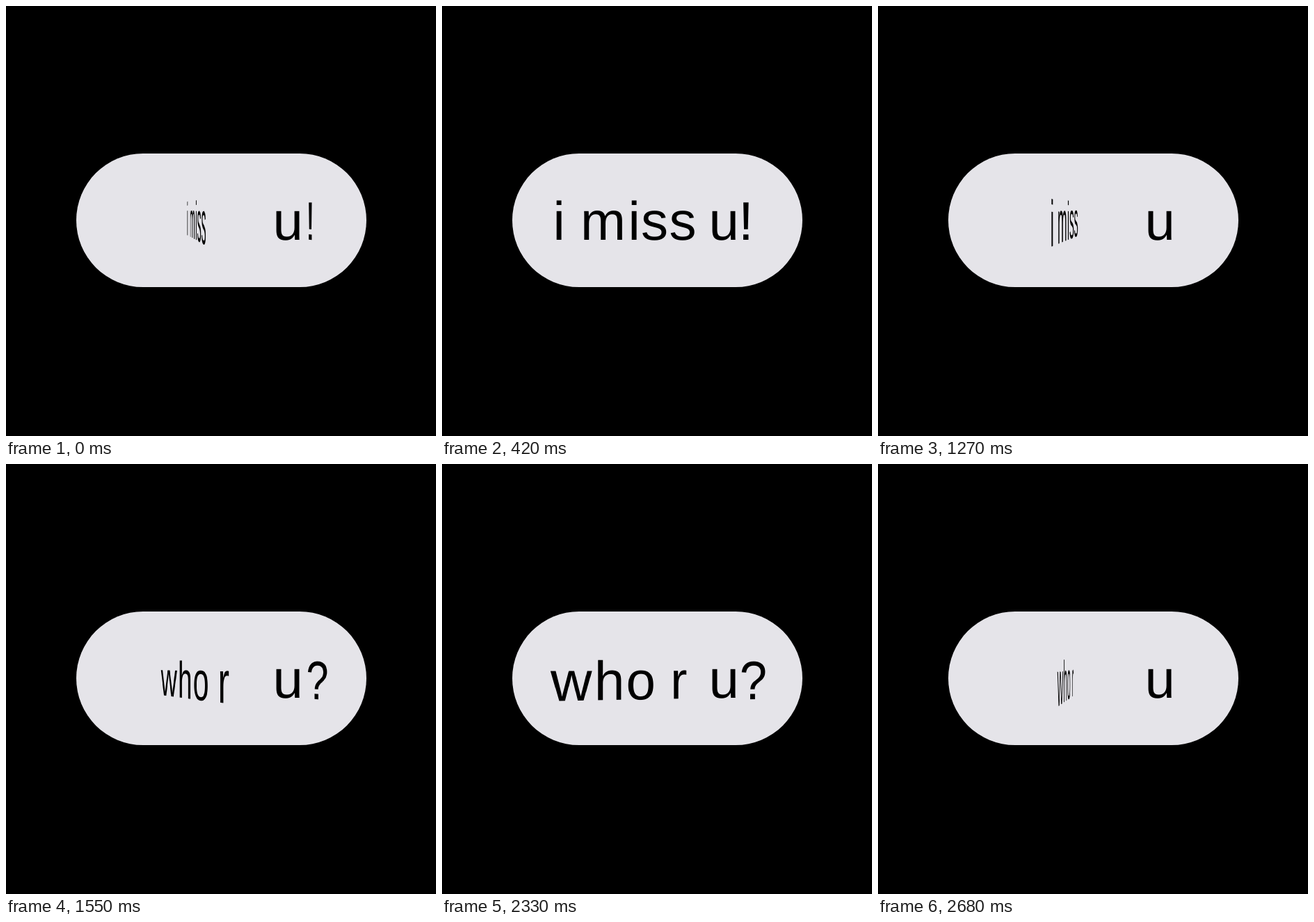
An HTML page with a canvas for the animation above (2.75 s loop, 618 px wide and 618 px high).

```html
<!DOCTYPE html>
<html lang="en">
<head>
<meta charset="utf-8">
<title>i miss u!</title>
<style>
  html, body { margin: 0; width: 100%; height: 100%; overflow: hidden; background: #000; }
  canvas { position: absolute; left: 0; top: 0; width: 618px; height: 618px; }
</style>
</head>
<body>
<canvas id="stage" width="618" height="618"></canvas>
<script>
const ctx = document.getElementById("stage").getContext("2d");
const LOOP = 2750, STEP = 70, TURN = 6;
const EYE = { x: 309, y: 290, d: 620 };

// Letters of a piece stand at the given x on one baseline.
// It swings in from angle "from" to flat, rests, then swings out to "to".
const miss = { start: 0, out: 850, end: 1410 };
const who = { start: 1410, out: 2260, end: LOOP };
const pieces = [
  { text: "imiss", xs: [159.5, 199, 267.5, 286, 326.5], y: 336, left: 160, right: 366,
    pivot: 273, from: -79, to: 83, ...miss },
  { text: "!", xs: [426], y: 336, left: 428, right: 446,
    pivot: 438, from: -66, to: 84, ...miss },
  { text: "whor", xs: [159.5, 219, 264.5, 330.5], y: 338.5, left: 157, right: 360,
    pivot: 273, from: -84, to: 87, ...who },
  { text: "?", xs: [426], y: 338, left: 426, right: 468,
    pivot: 446, from: -86, to: 90, ...who }
];

const steps = ms => Math.max(0, Math.min(TURN, Math.floor(ms / STEP + 1e-6)));

function angle(p, t) {
  const inward = 1 - steps(t - p.start) / TURN;
  return inward > 0 ? p.from * inward : p.to * steps(t - p.out) / TURN;
}

function letters(p) {
  p.xs.forEach((x, i) => ctx.fillText(p.text[i], x, p.y));
}

// Turns a piece about its vertical axis, one screen column at a time.
function turned(p, degrees) {
  const a = degrees * Math.PI / 180, sin = Math.sin(a), cos = Math.cos(a);
  const shift = p.pivot - EYE.x;
  const flatX = x => {
    const k = x - EYE.x;
    return p.pivot + EYE.d * (shift - k) / (k * sin - EYE.d * cos);
  };
  for (let x = 101; x < 518; x++) {
    const u0 = flatX(x), u1 = flatX(x + 1);
    if (u1 <= u0 || u1 < p.left || u0 > p.right) continue;
    const u = flatX(x + 0.5);
    const scale = EYE.d / (EYE.d + (u - p.pivot) * sin);
    const squeeze = 1 / (u1 - u0);
    const slope = -scale * scale * sin / EYE.d * (p.y - EYE.y);
    ctx.save();
    ctx.beginPath();
    ctx.rect(x, 212, 1, 192);
    ctx.clip();
    ctx.transform(squeeze, slope, 0, scale,
      x + 0.5 - squeeze * u, EYE.y * (1 - scale) - slope * u);
    letters(p);
    ctx.restore();
  }
}

function draw(t) {
  ctx.fillStyle = "#000";
  ctx.fillRect(0, 0, 618, 618);
  ctx.fillStyle = "#e5e4e9";
  ctx.beginPath();
  ctx.roundRect(101, 212, 417, 192, 96);
  ctx.fill();

  ctx.fillStyle = "#000";
  ctx.font = '78px "Liberation Sans", Arial, sans-serif';
  ctx.textRendering = "geometricPrecision";
  ctx.fillText("u", 383.5, 335.5);
  for (const p of pieces) {
    if (t < p.start || t >= p.end) continue;
    const a = angle(p, t);
    if (a === 0) letters(p);
    else if (Math.abs(a) < 89) turned(p, a);
  }
}

const t0 = performance.now();
function tick() {
  draw((performance.now() - t0) % LOOP);
  requestAnimationFrame(tick);
}
draw(0);
tick();
</script>
</body>
</html>
```
